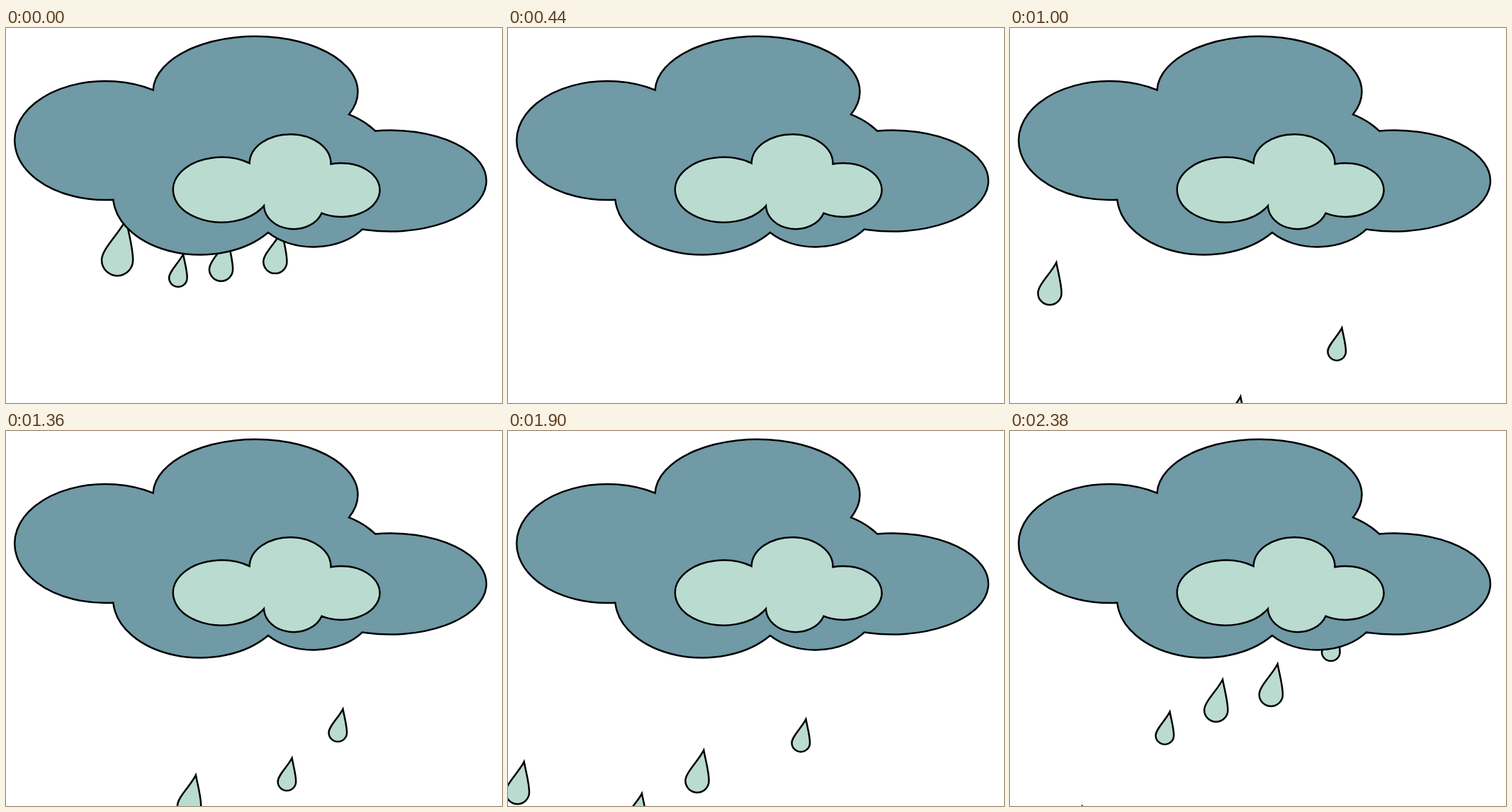
These frames come from a looping animation (700x530 px, 2.4 s). An HTML page without scripts:

```html
<!DOCTYPE html>
<html lang="en">
<head>
<meta charset="utf-8">
<title>Rain cloud</title>
<style>
  @property --time {
    syntax: "<number>";
    inherits: true;
    initial-value: 0;
  }

  html, body {
    margin: 0;
    width: 100%;
    height: 100%;
    overflow: hidden;
    background: #fff;
  }

  svg {
    display: block;
    width: 700px;
    height: 530px;
    stroke: #000;
    stroke-width: 2.5;
    animation: clock 2400ms steps(120) infinite;
  }

  @keyframes clock {
    from { --time: 0; }
    to { --time: 2400; }
  }

  .dark { fill: #6f9aa6; }
  .light { fill: #badbd0; }

  /* Each drop passes (--x, --y) at time --mid and repeats every --period ms.
     --phase runs from -0.5 to 0.5; the sine term eases both ends of the fall. */
  .drop {
    --phase: (mod((var(--time) - var(--mid)) / var(--period) + 0.5, 1) - 0.5);
    --fall: (var(--phase) + 0.1114 * sin(var(--phase) * 360deg));
    transform:
      translate(
        calc((var(--x) + var(--dx) * var(--fall)) * 1px),
        calc((var(--y) + var(--dy) * var(--fall)) * 1px))
      scale(var(--size));
  }

  .large { --size: 1.33; }
  .medium { --size: 1; }
  .small { --size: 0.77; }
</style>
</head>
<body>
<svg viewBox="0 0 700 530">
  <defs>
    <path id="drop" vector-effect="non-scaling-stroke"
      d="M9.3-60.5C12.4-44 16.6-30 16.6-17.3A16.6 16.6 0 0 1-16.6-17.3C-16.6-29 1.5-45 9.3-60.5Z"/>
  </defs>

  <g class="light">
    <use href="#drop" class="drop large" style="--mid:112; --period:723; --x:121.3; --y:488.4; --dx:-145; --dy:556"/>
    <use href="#drop" class="drop small" style="--mid:45; --period:580; --x:224.6; --y:424; --dx:-141; --dy:444"/>
    <use href="#drop" class="drop medium" style="--mid:103; --period:580; --x:280.5; --y:455; --dx:-83; --dy:348"/>
    <use href="#drop" class="drop medium" style="--mid:57; --period:781; --x:362; --y:413; --dx:-146; --dy:535"/>
    <use href="#drop" class="drop small" style="--mid:160; --period:580; --x:413.3; --y:454; --dx:-146; --dy:474"/>
    <use href="#drop" class="drop small" style="--mid:208; --period:380.5; --x:472; --y:423.5; --dx:-79; --dy:345"/>
    <use href="#drop" class="drop medium" style="--mid:245; --period:781; --x:46.5; --y:422.5; --dx:-170; --dy:541"/>
    <use href="#drop" class="drop medium" style="--mid:250; --period:690; --x:556.8; --y:524; --dx:-148; --dy:570"/>
  </g>

  <path class="dark" d="M207.6 87.6
    A144.5 78.5 0 1 1 484 122.2
    Q506 131 521 145.4
    A135.5 71.5 0 1 1 503 284.4
    A85 60 0 0 1 370 289
    A123 84 0 0 1 151.3 242.7
    A128 84 0 1 1 207.6 87.6Z"/>
  <path class="light" d="M343.7 191
    A57.4 41.5 0 0 1 458.5 192.3
    A54.5 38 0 1 1 445.5 261.7
    A42 34 0 0 1 364 251.2
    A68.5 46 0 1 1 343.7 191Z"/>
</svg>
</body>
</html>
```
